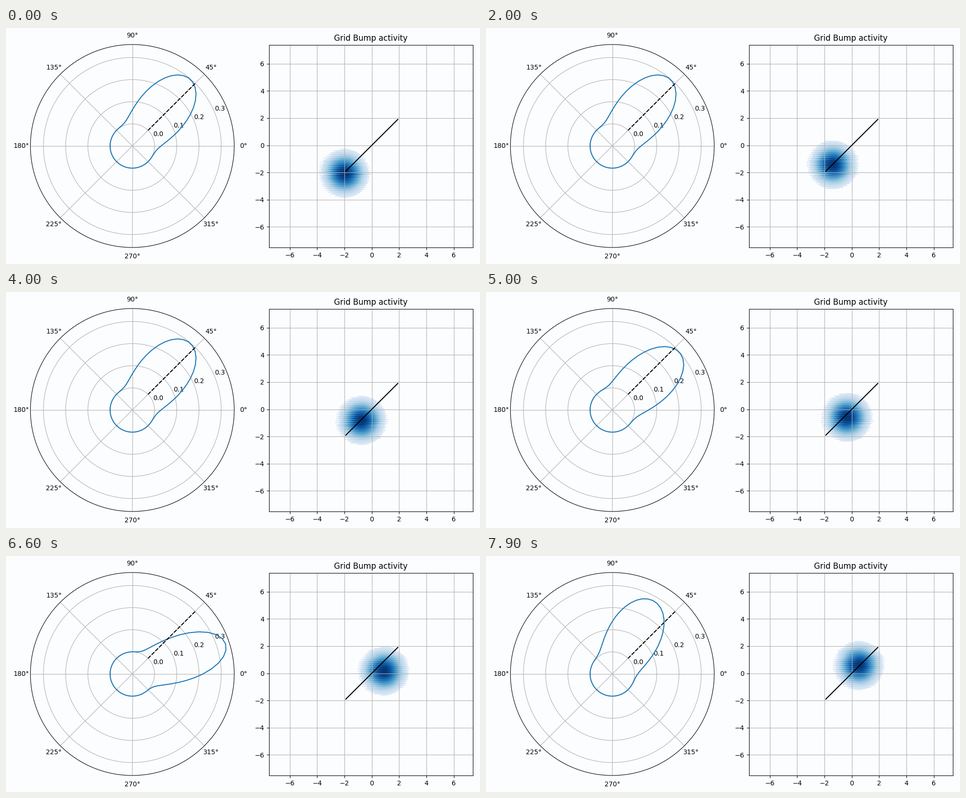
A matplotlib script that plays this animation: 1000 by 500 pixels, repeating every 8000 ms.

```python
import numpy as np
import matplotlib.pyplot as plt
from matplotlib.animation import FuncAnimation

FRAMES = 80
HALF = 10  # frames in one sweep; sweeps alternate right and left
BACK = "#fcfdff"

# One sweep to the right of the heading, step by step
TURN = [4.5, -3, -8.5, -12, -15.5, -21.5, -27, -27, -23, -15.5]
PEAK = [.2985, .304, .311, .32, .328, .337, .341, .33, .309, .279]
AHEAD = [0, 0, .02, .06, .2, .38, .49, .48, .33, .11]
ASIDE = [-.08, 0, .03, .08, .22, .43, .54, .58, .45, .22]

XLIM, YLIM = (-7.52, 7.40), (-7.51, 7.39)
SIZE = 430
SIGMA = .89
CUT = .13

fig = plt.figure(figsize=(10, 5), dpi=100, facecolor=BACK)

# Heading ring
polar = fig.add_axes([.0515, .07, .43, .86], projection="polar", facecolor=BACK)
polar.set_ylim(-.1, .3585)
polar.set_yticks([0, .1, .2, .3])
angles = np.radians(np.arange(-180, 181, 3.6))
ring, = polar.plot(angles, 0 * angles, color="tab:blue", lw=1.5)
polar.plot([np.pi / 4] * 2, [0, .3], "k--", lw=1.5)
polar.set_ylim(-.1, .3585)

# Grid sheet
sheet = fig.add_axes([.5547, .07, .4305, .859], facecolor=BACK)
sheet.set_title("Grid Bump activity")
cmap = plt.get_cmap("Blues")
xs = XLIM[0] + (np.arange(SIZE) + .5) / SIZE * (XLIM[1] - XLIM[0])
ys = YLIM[1] - (np.arange(SIZE) + .5) / SIZE * (YLIM[1] - YLIM[0])
gx, gy = np.meshgrid(xs, ys)

# Rows of the lattice are slightly staggered, which gives the streaks
row = np.arange(SIZE) // 2
side = (-1.0) ** row
noise = np.random.default_rng(4).normal(0, .04, SIZE)[row]
stagger = (.08 * side + noise)[:, None]
gain = (1 + .04 * side)[:, None]

bump = sheet.imshow(np.zeros((SIZE, SIZE, 4)), extent=(*XLIM, *YLIM),
                    interpolation="nearest", aspect="auto", zorder=0)
sheet.plot([-1.9, 1.9], [-1.9, 1.9], "k", lw=1.5)
sheet.set_xlim(XLIM)
sheet.set_ylim(YLIM)
sheet.set_xticks(range(-6, 7, 2))
sheet.set_yticks(range(-6, 7, 2))
sheet.grid(True)


def ring_profile(step, sign):
    centre = np.radians(45 + sign * TURN[step])
    width = np.radians(24.8 - 94 * (PEAK[step] - .279))
    gap = np.angle(np.exp(1j * (angles - centre)))
    return PEAK[step] * np.exp(-gap ** 2 / (2 * width ** 2))


def bump_image(cx, cy):
    dist2 = (gx - cx + stagger) ** 2 + (gy - cy) ** 2
    value = gain * np.exp(-dist2 / (2 * SIGMA ** 2))
    rgba = cmap(np.clip(value, 0, 1))
    rgba[..., 3] = value > CUT
    return rgba


def update(n):
    step = n % HALF
    sign = 1 if n // HALF % 2 == 0 else -1
    ring.set_ydata(ring_profile(step, sign))
    along = -2.02 + .031 * n + AHEAD[step]
    across = (sign * ASIDE[step] + .17) / 2
    bump.set_data(bump_image(along + across, along - across))
    return ring, bump


anim = FuncAnimation(fig, update, frames=FRAMES, interval=100,
                     init_func=lambda: update(0), repeat=True,
                     repeat_delay=0, blit=False)
plt.show()
```
